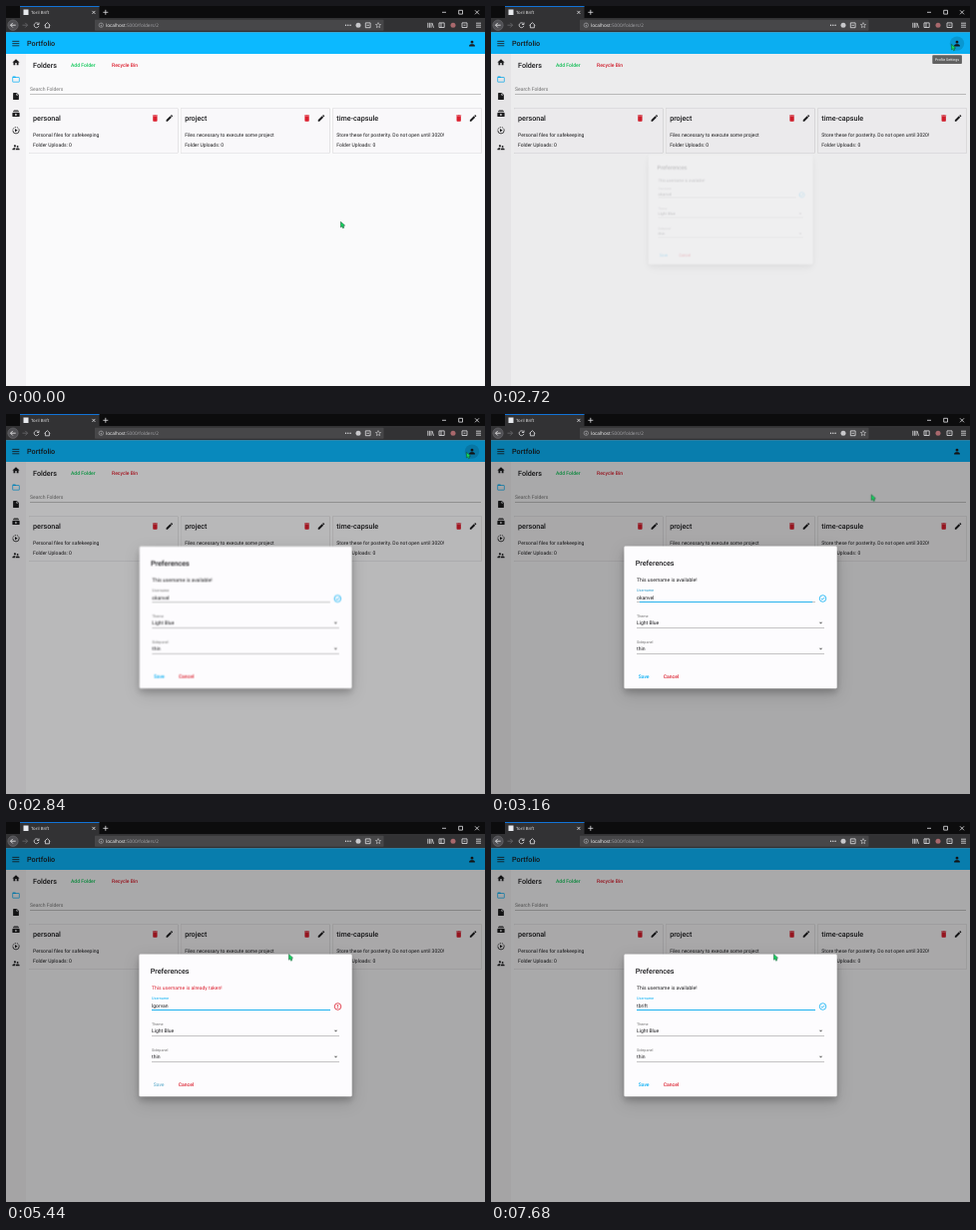
An HTML page for the animation above (8000 ms loop, 480 by 381 pixels).

```html
<!DOCTYPE html>
<html lang="en">
<head>
<meta charset="utf-8">
<title>Portfolio</title>
<style>
html, body { margin: 0; width: 100%; height: 100%; overflow: hidden; background: #fafafa; }
svg { display: block; width: 480px; height: 381px; }
text { font-family: Roboto, sans-serif; text-rendering: geometricPrecision; white-space: pre; }
.ui { font-family: "Open Sans", sans-serif; }
.line { fill: none; stroke-width: .8; }
.a { animation: 8s linear infinite; }
.cursor { animation-name: move; animation-timing-function: ease-in-out; }
.tip { animation-name: tip; }
.ripple { animation-name: ripple; }
.shade { animation-name: shade; }
.dialog { animation-name: open; transform-origin: 240px 203.9px; }
.bar { animation-name: bar; transform-origin: 235.5px 0; }
.label { animation-name: label; }
.save { animation-name: save; }
.shadow { filter: drop-shadow(0 4px 3px rgba(0,0,0,.18)) drop-shadow(0 5px 8px rgba(0,0,0,.16)); }
.lift { filter: drop-shadow(0 .7px .7px rgba(0,0,0,.35)); }
@keyframes move {
  0%, 23% { transform: translate(335px, 216px); }
  32.5%, 36.4% { transform: translate(461px, 38px); }
  43%, 100% { transform: translate(283px, 132.3px); }
}
@keyframes tip {
  0%, 31% { opacity: 0; }
  32.8%, 34.1% { opacity: 1; }
  35%, 100% { opacity: 0; }
}
@keyframes ripple {
  0%, 33% { opacity: 0; }
  34%, 35.5% { opacity: .13; }
  39%, 100% { opacity: 0; }
}
@keyframes shade {
  0%, 33.5% { opacity: 0; }
  34% { opacity: .05; }
  34.5% { opacity: .13; }
  35% { opacity: .19; }
  35.5% { opacity: .255; }
  36.5% { opacity: .3; }
  38.5%, 100% { opacity: .32; }
}
@keyframes open {
  0%, 33.5% { transform: scale(.7); opacity: 0; }
  34% { transform: scale(.77); opacity: .18; }
  34.5% { transform: scale(.86); opacity: .6; }
  35% { transform: scale(.942); opacity: .92; }
  35.5% { transform: scale(.997); opacity: 1; }
  36%, 100% { transform: none; opacity: 1; }
}
@keyframes bar {
  0%, 36% { transform: scaleX(.5); opacity: 0; }
  39.75%, 100% { transform: none; opacity: 1; }
}
@keyframes label {
  0%, 36% { fill: #757575; }
  41%, 100% { fill: #0cb0f4; }
}
@keyframes save {
  0%, 65% { fill: #0cb0f4; }
  70%, 95.49% { fill: #bdbdbd; }
  95.5%, 100% { fill: #0cb0f4; }
}
</style>
</head>
<body>
<script>
const INK = '#1c1c1e', RED = '#dc1f2e', BLUE = '#0cb0f4', PALE = '#e4e4e6';
const P = {
  person: 'M12 12a4 4 0 1 0 0-8 4 4 0 0 0 0 8zm0 2c-2.67 0-8 1.34-8 4v2h16v-2c0-2.66-5.33-4-8-4z',
  home: 'M10 20v-6h4v6h5v-8h3L12 3 2 12h3v8z',
  folder: 'M20 6h-8l-2-2H4a2 2 0 0 0-2 2v12a2 2 0 0 0 2 2h16a2 2 0 0 0 2-2V8a2 2 0 0 0-2-2zm0 12H4V8h16z',
  file: 'M6 2a2 2 0 0 0-2 2v16a2 2 0 0 0 2 2h12a2 2 0 0 0 2-2V8l-6-6zm7 7V3.5L18.5 9z',
  queue: 'M20 8H4V6h16zM18 2H6v2h12zM22 12v8a2 2 0 0 1-2 2H4a2 2 0 0 1-2-2v-8c0-1.1.9-2 2-2h16a2 2 0 0 1 2 2zm-6 4l-6-3.3v6.6z',
  people: 'M16.5 12a2.5 2.5 0 1 0 0-5 2.5 2.5 0 0 0 0 5zM9 11a3 3 0 1 0 0-6 3 3 0 0 0 0 6zm7.5 3c-1.8 0-5.5.9-5.5 2.75V19h11v-2.25c0-1.8-3.7-2.75-5.5-2.75zM9 13c-2.3 0-7 1.2-7 3.5V19h7v-2.25c0-.85.3-2.3 2.4-3.5C10.5 13.1 9.7 13 9 13z',
  trash: 'M6 19a2 2 0 0 0 2 2h8a2 2 0 0 0 2-2V7H6zM19 4h-3.5l-1-1h-5l-1 1H5v2h14z',
  pen: 'M3 17.25V21h3.75L17.8 9.94l-3.75-3.75zM20.7 7c.4-.4.4-1 0-1.4l-2.3-2.3c-.4-.4-1-.4-1.4 0l-1.9 1.8 3.75 3.75z',
  star: 'M12 2l3 7 7 .6-5.300 4.700 1.600 7L12 17.500l-6.300 3.800 1.600-7L2 9.600 9 9z'
};

const rules = [];
const pct = ms => ms / 80 + '%';

// Hard on/off interval; swap the last two to invert it
function show(from, to, on = 'visible', off = 'hidden') {
  const name = 'k' + rules.length;
  rules.push(`@keyframes ${name} { 0%, 100% { visibility: ${off} } ${pct(from)} { visibility: ${on} } ${pct(to)} { visibility: ${off} } }`);
  return `style="animation:${name} 8s step-end infinite"`;
}

// Text placed by the middle of its capitals
const text = (x, cy, s, size = 5.04, fill = INK, weight = 400, extra = '') =>
  `<text x="${x}" y="${(cy + size * .355).toFixed(2)}" font-size="${size}" fill="${fill}" font-weight="${weight}" ${extra}>${s}</text>`;
const rect = (x, y, w, h, fill, extra = '') =>
  `<rect x="${x}" y="${y}" width="${w}" height="${h}" fill="${fill}" ${extra}/>`;
const icon = (d, cx, cy, fill = INK, s = .36) =>
  `<path d="${P[d]}" fill="${fill}" transform="translate(${cx - 12 * s} ${cy - 12 * s}) scale(${s})"/>`;
const line = (d, stroke = PALE, extra = '') => `<path class="line" d="${d}" stroke="${stroke}" ${extra}/>`;
const ring = (x, y, r, stroke, extra = '') =>
  `<circle class="line" cx="${x}" cy="${y}" r="${r}" stroke="${stroke}" ${extra}/>`;

function browser() {
  return rect(0, 0, 480, 12, '#0c0c0d') + rect(0, 12, 480, 14.2, '#323234')
    + rect(14, 0, 79.5, 12, '#323234') + rect(14, 0, 79.5, .8, '#0a84ff')
    + rect(17.5, 3.5, 5, 5.500, '#e8eaee')
    + text(25, 6.4, 'Toril Brift', 4.3, '#f4f4f5', 400, 'class="ui"')
    + line('M86.400 4.900l3 3m0-3l-3 3M97.300 6.300h5m-2.500-2.500v5')
    + line('M437 6.300h4M453.700 4.300h3.800v3.800h-3.800zM470 4.300l4 4m0-4l-4 4')
    + '<circle cx="7" cy="19.200" r="5.200" fill="#505054" stroke="#77777b" stroke-width=".5"/>'
    + line('M9.700 19.200H4.600m2.200-2.300l-2.300 2.300 2.300 2.300', '#f4f4f5')
    + line('M16.500 19.200h5m-2.200-2.300l2.300 2.300-2.300 2.300', '#6c6c70')
    + line('M32.400 17.700a2.400 2.400 0 1 0 .5 2.200M33 16.500v2h-2')
    + line('M38.500 19.400l2.900-2.700 2.900 2.700M39.400 19v2.800h4V19')
    + rect(89, 13.800, 289.500, 11, '#474749', 'rx=".8"')
    + ring(95.3, 19.2, 2.2, '#bdbdc0', 'style="stroke-width:.5"') + line('M95.300 18.900v1.500M95.300 17.600v.5', '#bdbdc0')
    + text(100, 19.5, 'localhost<tspan fill="#a5a5a9">:5000/folders/2</tspan>', 4.7, '#f9f9fa', 400, 'class="ui"')
    + [340.5, 342.8, 345.1].map(x => `<circle cx="${x}" cy="19.200" r=".7" fill="${PALE}"/>`).join('')
    + `<circle cx="353" cy="19.200" r="2.500" fill="#c8c8cb"/>`
    + line('M360.300 16.900h4.800v4.800h-4.800zM361.500 19.300h2.400')
    + `<g fill="none" stroke="${PALE}" stroke-width="2">${icon('star', 373, 19.2, 'none', .26)}</g>`
    + line('M422.800 16.800v5M424.400 16.800v5M426 16.800v5M427 17l1.500 4.800')
    + line('M434 16.900h5.200v4.600H434zM436 17v4.500')
    + '<circle cx="448" cy="19.200" r="2.500" fill="#a9686c"/>'
    + line('M457 16.900h5v4.600h-5zM458.500 19.200h2')
    + line('M471 17.200h5M471 19.200h5M471 21.200h5');
}

function card(i, title, about) {
  const x = 23 + i * 152.15;
  return rect(x, 102.2, 149.4, 45.6, '#f9f8fa', 'rx="1.200" class="lift"')
    + text(x + 4, 112.4, title, 7.2, INK, 500)
    + icon('trash', x + 126.4, 112.4, RED) + icon('pen', x + 140.8, 112.4)
    + text(x + 4, 129.5, about) + text(x + 4, 139.5, 'Folder Uploads: 0');
}

function page() {
  return rect(0, 26, 480, 355, '#fafafb') + rect(0, 48, 20, 333, '#f3f2f4')
    + rect(0, 26.2, 480, 21.8, '#0cb9ff')
    + line('M6.300 35.400h7M6.300 37.600h7M6.300 39.800h7', INK)
    + text(21, 37.6, 'Portfolio', 7.2, INK, 500) + icon('person', 467, 37.6)
    + icon('home', 10, 56.4) + icon('folder', 10, 73.5, BLUE) + icon('file', 10, 90.5) + icon('queue', 10, 107.5)
    + ring(10, 124.7, 3.2, INK, 'stroke-dasharray="10 .9 1.500 .9 1.500 .9 1.500 .9"')
    + `<path d="M9 123.100l2.600 1.600-2.600 1.600z" fill="${INK}"/>`
    + icon('people', 10, 141.8)
    + text(27, 59.3, 'Folders', 7.2, INK, 500)
    + text(65, 59.3, 'Add Folder', 5.04, '#0cc757', 500) + text(106, 59.3, 'Recycle Bin', 5.04, RED, 500)
    + text(24, 83.5, 'Search Folders', 5.04, '#757575') + rect(24, 88.3, 452, .5, '#8a8a8a')
    + card(0, 'personal', 'Personal files for safekeeping')
    + card(1, 'project', 'Files necessary to execute some project')
    + card(2, 'time-capsule', 'Store these for posterity. Do not open until 3020!');
}

function selectBox(cy, label, value) {
  return text(146, cy - 7, label, 3.78, '#757575') + text(146, cy, value)
    + rect(146, cy + 4.7, 188, .5, '#8a8a8a')
    + `<path d="M328.700 ${cy - .7}h3.600l-1.800 1.800z" fill="#6c6c6c"/>`;
}

// A username typed at the given times, then selected, then replaced
function entry(name, keys, select, end) {
  const letters = [...name].map((c, i) => `<tspan ${show(keys[i] || 0, select)}>${c}</tspan>`).join('');
  const typed = text(146, 184, letters);
  if (select === end) return typed;
  return typed + `<g ${show(select, end)}>` + rect(146, 181.3, 17.7, 7, '#0078d7')
    + text(146, 184, name, 5.04, '#fff') + '</g>';
}

function dialog() {
  const ok = show(5200, 7640, 'hidden', 'visible'), bad = show(5200, 7640);
  return '<g class="a dialog">'
    + rect(133.4, 132.5, 213.3, 142.8, '#fdfcfe', 'rx="1.400" class="shadow"')
    + text(144.7, 149.5, 'Preferences', 7.2, INK, 500)
    + text(146, 166, 'This username is available!', 5.04, INK, 400, ok)
    + text(146, 166, 'This username is already taken!', 5.04, RED, 400, bad)
    + text(146, 176.8, 'Username', 3.78, '#757575', 400, 'class="a label"')
    + rect(146, 188.2, 179, .5, '#8a8a8a') + rect(146, 188, 179, .9, BLUE, 'class="a bar"')
    + entry('okanvel', [], 3600, 4040)
    + entry('lgorvan', [4040, 4240, 4360, 4520, 4720, 4800, 4960], 6240, 6640)
    + entry('tbrift', [6640, 6760, 6880, 7000, 7120, 7240], 8000, 8000)
    + `<g ${ok}>` + ring(332.5, 185, 3.3, BLUE) + line('M330.900 185l1.200 1.200 2.300-2.400', BLUE) + '</g>'
    + `<g ${bad}>` + ring(332.5, 185, 3.3, RED) + line('M332.500 183.200v2.200M332.500 186.100v.8', RED) + '</g>'
    + selectBox(209.5, 'Theme', 'Light Blue') + selectBox(235.4, 'Sidepanel', 'thin')
    + text(147.7, 263, 'Save', 5.04, BLUE, 500, 'class="a save"') + text(172.8, 263, 'Cancel', 5.04, RED, 500)
    + '</g>';
}

const tip = '<g class="a tip">' + rect(442.3, 49.3, 29.6, 8.7, '#616161', 'rx=".800"')
  + text(457.1, 53.7, 'Profile Settings', 3.6, '#fff', 400, 'text-anchor="middle"') + '</g>';
const cursor = '<path class="a cursor" d="M.400 .300v5.600l1.300-1 .9 1.900 1.200-.6-.9-1.800 1.700-.3z" fill="#12d860" stroke="#12442a" stroke-width=".5"/>';

const svg = '<svg viewBox="0 0 480 381" xmlns="http://www.w3.org/2000/svg">' + page()
  + '<circle class="a ripple" cx="467" cy="37.600" r="7.200"/>'
  + rect(0, 26.2, 480, 354.8, '#000', 'class="a shade"')
  + tip + dialog() + browser() + cursor + '</svg>';
document.head.insertAdjacentHTML('beforeend', `<style>${rules.join('\n')}</style>`);
document.body.innerHTML = svg;
</script>
</body>
</html>
```
